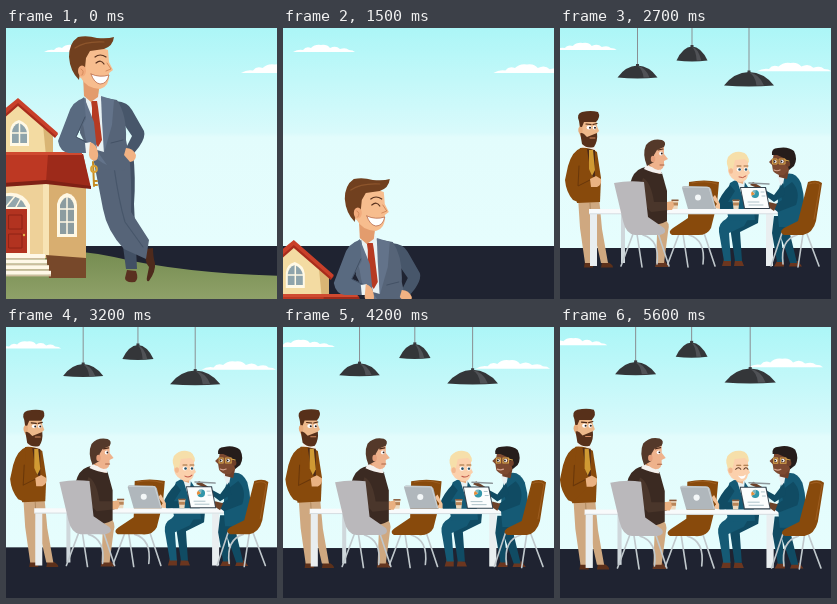
Recreate the animation shown at these times as an HTML page with a canvas. Size 271x271 px, loop 5700 ms.

```html
<!DOCTYPE html>
<html lang="en">
<head>
<meta charset="utf-8">
<title>House and meeting</title>
<style>
html, body { margin: 0; width: 100%; height: 100%; overflow: hidden; background: #dffafb; }
canvas { display: block; width: 100vw; height: 100vh; }
</style>
</head>
<body>
<canvas id="stage"></canvas>
<script>
const SIZE = 271, LOOP = 5700, STEP = 100;
const BROWN = '#884a0c', TEAL = '#155a75', DEEP_TEAL = '#104b63', TAN = '#cfa880';
const canvas = document.getElementById('stage');
const g = canvas.getContext('2d');
const paths = new Map();

function path(d) {
  if (!paths.has(d)) paths.set(d, new Path2D(d));
  return paths.get(d);
}
function fill(color, d) {
  g.fillStyle = color;
  g.fill(path(d));
}
function line(color, width, d) {
  g.strokeStyle = color;
  g.lineWidth = width;
  g.lineCap = g.lineJoin = 'round';
  g.stroke(path(d));
}
function oval(color, x, y, rx, ry = rx) {
  g.fillStyle = color;
  g.beginPath();
  g.ellipse(x, y, rx, ry, 0, 0, Math.PI * 2);
  g.fill();
}
function rect(color, x, y, w, h) {
  g.fillStyle = color;
  g.fillRect(x, y, w, h);
}
function group(x, y, scale, draw) {
  g.save();
  g.translate(x, y);
  g.scale(scale, scale);
  draw();
  g.restore();
}
const clamp = v => Math.min(1, Math.max(0, v));
const easeInOut = p => p < .5 ? 4 * p ** 3 : 1 - (2 - 2 * p) ** 3 / 2;

// piecewise linear value through [time, value] pairs
function track(t, keys) {
  let i = 1;
  while (i < keys.length - 1 && t > keys[i][0]) i++;
  const [a, va] = keys[i - 1], [b, vb] = keys[i];
  return va + (vb - va) * clamp((t - a) / (b - a));
}

function backdrop(t) {
  const sky = g.createLinearGradient(0, 0, 0, 218);
  sky.addColorStop(0, '#acf6f7');
  sky.addColorStop(.48, '#d9fafb');
  sky.addColorStop(.5, '#e2fcfc');
  sky.addColorStop(1, '#e6fdfd');
  rect(sky, 0, 0, SIZE, 225);
  const floor = track(t, [[1500, 218], [2700, 220], [5600, 222]]);
  rect('#1f2331', 0, floor, SIZE, SIZE - floor);
}

function clouds(t) {
  const x = track(t, [[0, 0], [1200, -16], [1500, -28], [1800, -38], [2000, -41], [5700, -53]]);
  const y = track(t, [[0, 0], [1500, 0], [2000, -1], [5700, -6]]);
  const shape = 'M0 7Q5 4 10 5Q13 1 18 3Q22-1 28 0Q34-1 37 3Q43 0 47 4Q53 2 56 5Q60 5 62 7Z';
  group(38 + x, 17 + y, 1, () => fill('#fff', shape));
  group(235 + x * .88, 36.5 + y * .8, 1.2, () => fill('#fff', shape));
}

function house() {
  fill('#f3dba2', 'M-4 84L12 76L47 106V128H-4Z');
  fill('#d9b574', 'M37 97L47 106V128H40Z');
  fill('#a82c1c', 'M12 71L52 106L49 110L12 78L-4 92V86Z');
  fill('#c9402a', 'M12 70L52 105L50 108L12 75L-4 89V83Z');
  fill('#fff9e6', 'M4 118V103Q5 94 13 92Q22 95 23 104V118Z');
  fill('#8fa4ab', 'M6 115V104Q7 97 13 95Q20 98 21 105V115Z');
  line('#fff9e6', 1.5, 'M13.5 95V115M6 105H21');

  fill('#eed199', 'M-4 154H42V230H-4Z');
  fill('#d8ae70', 'M42 155H80V230H42Z');
  fill('#f7e3b4', 'M37 156H43V228H37Z');
  fill('#77482a', 'M40 227L80 230V250H43Z');
  fill('#bd3823', 'M-4 126H77L84 159L40 154L-4 157Z');
  fill('#9d2a1a', 'M42 126H77L85 160L40 154Z');
  fill('#cf4a30', 'M-4 124H76V127H-4Z');
  fill('#7f2115', 'M-4 155L40 152L85 158V161L40 156L-4 159Z');

  fill('#fff8e4', 'M51 209V176Q53 167 61 165Q70 167 71 177V209Z');
  fill('#8c9ca0', 'M54 206V177Q56 171 61 169Q67 171 68 178V206Z');
  line('#fff8e4', 1.5, 'M61 169V206M54 181H68M54 194H68');

  fill('#fff8e4', 'M-4 226V166Q16 161 24 177V226Z');
  fill('#93a7ac', 'M-4 179V169Q14 165 20 179Z');
  line('#fff8e4', 1.5, 'M0 179L9 168M10 179L15 170');
  rect('#b23320', -4, 181, 25, 44);
  line('#8d2315', 1, 'M3 187H16V201H3ZM3 206H16V220H3Z');
  oval('#e6b64d', 18, 207, 1.2);
  for (let i = 0; i < 4; i++) {
    rect('#fff8e8', -4, 226 + i * 5.6, 43 + i * 2, 4);
    rect('#cdbd9e', -4, 230 + i * 5.6, 43 + i * 2, 1.6);
  }
}

function leaningMan() {
  // legs and shoes
  fill('#4e2a1c', 'M140 221L147 220Q147 229 149 235Q150 243 143 253Q140 254 141 249L143 239Q138 234 140 221Z');
  fill('#5a3020', 'M121 242L130 243Q133 251 129 254Q119 255 119 250Z');
  fill('#425064', 'M105 128L127 124Q130 150 128 176L131 241L120 241L112 180Z');
  fill('#566478', 'M86 124H123Q126 153 125 184L143 212L140 231L118 221Q101 203 97 181Z');
  line('#47566a', 1.2, 'M108 139Q113 174 119 194L137 219');
  // jacket and arms
  fill('#47566a', 'M110 73Q122 74 126 82L138 103Q140 109 133 119L124 130L118 124L126 108L115 92Z');
  fill('#566478', 'M75 71Q91 67 111 72Q121 87 120 112Q125 130 118 143L92 141Q80 117 74 105Z');
  fill('#e8f2f4', 'M79 65L94 66L97 78L98 124L91 122L81 83Z');
  fill('#b63a22', 'M85 73L91 73L92 79L96 112L92 119L86 111L86 80Z');
  fill('#63738a', 'M78 69L88 94L91 123L101 137Q81 129 78 101L72 75Z');
  fill('#63738a', 'M95 68L108 72L106 97L98 125L96 93Z');
  fill('#596a80', 'M78 70Q66 73 62 87L52 113Q54 124 63 125L84 125L85 115L70 109L80 91Z');
  line('#435165', 1, 'M79 89L70 109L82 115M105 115L117 112');
  fill('#edf4f4', 'M79 115L85 114L86 125L80 125Z');
  fill('#f2b283', 'M84 114Q91 116 92 125Q93 132 88 133Q82 130 83 125Z');
  fill('#f2b283', 'M120 120Q127 120 130 127Q130 133 124 134L118 127Z');
  // key
  line('#c48a22', 2, 'M87 134L88 158M88 153H91M88 157H91');
  g.strokeStyle = '#d9a133';
  g.lineWidth = 1.8;
  g.beginPath();
  g.arc(88, 141, 3, 0, Math.PI * 2);
  g.stroke();
  // head
  fill('#e39c6d', 'M77 48L94 54L92 69L85 74L78 68Z');
  fill('#f7bd8e', 'M72 25Q86 16 102 22L103 34L107 42L103 45Q104 58 94 61Q80 60 75 50Q68 48 69 40Z');
  fill('#71401f', 'M73 52Q64 43 63 29Q63 15 72 9Q81 7 91 10Q102 11 108 9Q107 18 98 21L84 23L80 30L79 40L74 41Z');
  line('#8d552c', 1.2, 'M69 20Q79 13 98 14');
  oval('#f2ab7c', 76, 43, 4, 5.5);
  line('#d48b5c', 1, 'M75 41Q79 43 76 47M101 35L105 41L100 43');
  line('#57301d', 1.2, 'M90 35Q95 31 98 36M89 29Q94 25 100 29');
  fill('#fff', 'M85 46Q94 50 103 47Q101 56 94 56Q88 55 85 46Z');
  line('#b96d4d', .8, 'M85 46Q94 50 103 47Q101 56 94 56Q88 55 85 46');
}

function houseScene(t) {
  const drop = 284 * easeInOut(clamp((t - 1200) / 600));
  group(-1.2 * Math.min(t, 1500) / 1500, drop, 1, () => {
    const grass = g.createLinearGradient(0, 222, 0, 271);
    grass.addColorStop(0, '#758c50');
    grass.addColorStop(1, '#8fa169');
    fill(grass, 'M-5 222Q55 218 108 229Q175 245 276 248V280H-5Z');
    house();
    leaningMan();
  });
}

function lamp(x, y, w, h) {
  const bottom = y + h;
  line('#8a8f93', 1, `M${x} -90V${y}`);
  rect('#3b3c40', x - 1.5, y - 2, 3, 4);
  fill('#343639', `M${x - w} ${bottom}Q${x - w * .6} ${y} ${x} ${y - .5}Q${x + w * .6} ${y} ${x + w} ${bottom}Q${x} ${bottom + 2} ${x - w} ${bottom}Z`);
  fill('#505256', `M${x} ${y}Q${x + w * .4} ${y + 1} ${x + w * .6} ${bottom}H${x + w * .3}Q${x + w * .25} ${y + 3} ${x} ${y}Z`);
}

function beardedMan(t) {
  fill('#5c301a', 'M25 233L33 233V239.5H24ZM42 234L47 234Q53 236 53 239.5H41Z');
  fill(TAN, 'M18 169H39L42 201L48 235H41L32 195L33 235H25L20 200Z');
  line('#b18a60', 1, 'M30 175L31 194');
  fill('#f4f1ea', 'M23 116L33 117L36 123L31 126L21 121Z');
  fill(BROWN, 'M20 120Q29 119 37 124L41 150L40 174L17 175Q14 160 13 148Z');
  fill('#4d2a17', 'M27 121L35 122L35 150L31 147Z');
  fill('#d09a33', 'M29 122L33 122L35 142L32 148L29 141Z');
  fill(BROWN, 'M21 120Q12 123 8 138L5 152Q6 164 13 172L18 174L32 160L30 152L18 158L20 140Z');
  line('#69370a', 1, 'M19 138L18 158L30 152');
  fill('#eab282', 'M30 151L36 148L41 151Q42 157 37 159L31 159Z');
  fill('#edb88a', 'M20 91L36 91L37 98L39 103L36 106L35 112L23 113L19 105Z');
  fill('#57301a', 'M19 93Q16 86 22 84Q31 82 38 84Q41 89 36 94L24 94L22 99H20Z');
  fill('#57301a', 'M20 104L24 106L27 109L37 105Q38 113 34 119Q27 121 22 116Z');
  oval('#e7aa7a', 20.5, 102, 2.2, 3.2);
  if (t >= 3500 && t < 3800) {
    line('#553019', 1.1, 'M27 99H31M33 99H36');
  } else {
    oval('#fff', 29, 99.5, 2.4, 2);
    oval('#fff', 34.5, 99.5, 1.8, 2);
    oval('#29201d', 30, 99.7, 1);
    oval('#29201d', 35, 99.7, 1);
  }
  line('#4d2914', 1.2, 'M26 96L31 96.5M33 96.5L37 95.5');
  line('#d68d63', 1, 'M30 110H35');
}

function chairLegs(x, flip) {
  g.save();
  g.translate(x, 0);
  g.scale(flip, 1);
  line('#c0c8cc', 1.6, 'M0 206L-12 238M4 206L9 239M25 205L36 238M10 207Q27 212 24 236');
  g.restore();
}

function middleChair() {
  chairLegs(119, 1);
  fill(BROWN, 'M129 154Q144 151 159 154L157 176L151 200Q147 208 136 207H112Q107 204 113 200L128 190Z');
  line('#9d5d20', 1, 'M132 155Q145 152 157 156');
}

function blondeWoman(t) {
  fill('#6b361f', 'M164 231L171 232V238H162ZM175 232L182 233L184 238H174Z');
  fill(DEEP_TEAL, 'M174 184H199L198 195L180 204L182 233H175L170 199Z');
  fill(TEAL, 'M172 184H192L184 198L169 205L171 233H164L159 204Q158 195 166 191Z');
  fill(TEAL, 'M170 155Q176 150 184 153L192 165L195 192L169 193Q163 172 170 155Z');
  fill('#e9f2f3', 'M177 152L185 153L183 171Z');
  fill(DEEP_TEAL, 'M170 157Q161 166 157 177L161 182L175 180L173 174L168 174L175 163Z');
  fill('#f3c298', 'M157 176L152 170L155 167L160 176L160 181L154 180Z');
  fill('#e8ad82', 'M176 146L184 148L183 156L177 154Z');
  fill('#fbd0ac', 'M169 130L188 130L188 141L190 145L188 147Q187 154 180 154Q170 152 168 143Z');
  fill('#f6dfaa', 'M170 143Q165 136 168 129Q173 123 181 124Q189 125 189 135L185 131L175 132L173 141Z');
  oval('#f2b88f', 171, 143, 2, 2.8);
  if (t >= 5400) {
    line('#54321f', 1, 'M176 142Q179 139 181 142M184 142Q186 139 188 142');
    fill('#fff', 'M178 148Q182 150 186 147Q185 152 181 151Z');
  } else {
    oval('#fff', 179, 141.5, 2.3, 2);
    oval('#fff', 185.8, 141.5, 1.9, 2);
    oval('#285066', 179.6, 141.5, 1.3);
    oval('#285066', 186, 141.5, 1.2);
    line('#c15a4a', 1, 'M179 149Q183 151 186 148');
  }
  line('#9b6a3a', 1, 'M177 138L181 138M184 138L188 138');
}

function presenter() {
  fill('#6b361f', 'M217 233L224 232V238.5H214ZM231 233H238L242 238.5H229Z');
  fill(DEEP_TEAL, 'M214 188H240L242 199L230 206L237 235H230L221 209L224 234H217L212 205Z');
  fill(TEAL, 'M223 147Q235 142 241 155Q247 175 242 199H219Q215 168 223 147Z');
  fill('#e8f0f2', 'M217 147L225 146L222 162Z');
  fill('#70402a', 'M218 138L230 137L227 151L219 149Z');
  fill('#7d4930', 'M214 124L230 124L232 138L224 147Q217 148 213 143L212 137L209 134L213 130Z');
  fill('#261d1b', 'M212 127Q211 120 218 120Q228 118 234 123Q238 131 234 138L229 142L226 131L217 127Z');
  oval('#70402a', 228, 136, 2.2, 2.8);
  line('#d8a74b', 1, 'M213 131H217V136H213ZM219.5 131H225V136H219.5ZM225 132L229 133');
  oval('#fff', 215, 133.5, 1.5);
  oval('#fff', 222, 133.5, 1.7);
  oval('#1e1718', 214.5, 133.5, .9);
  oval('#1e1718', 221.5, 133.5, .9);
  line('#d8a590', 1.2, 'M214 142Q217 143.5 220 142');
  fill(DEEP_TEAL, 'M232 154Q241 163 236 177L218 184L211 179L222 172L220 163Z');
  fill(DEEP_TEAL, 'M223 155L214 167L203 161L202 165L214 174L225 167Z');
  fill('#6d4229', 'M203 160L193 154L190 157L200 161Z');
  line('#8e979b', 1.5, 'M189 155L209 156');
  fill('#6d4229', 'M217 176L209 174L208 179L214 183Z');
}

function table() {
  rect('#cfd7db', 61, 186, 4, 49);
  rect('#e9eef0', 30, 186, 7, 52);
  rect('#e9eef0', 206, 186, 7, 52);
  fill('#f8fafb', 'M29 181H236V186H29Z');
  rect('#d5dde1', 29, 185.3, 207, 1);
}

function cup(x) {
  fill('#ecd9c0', `M${x - 3.5} 172H${x + 3.5}L${x + 2.5} 181H${x - 2.5}Z`);
  rect('#b88558', x - 3, 174.5, 6, 3);
  rect('#8a5c3d', x - 3.5, 171.5, 7, 1.5);
}

function tableTop(t) {
  fill('#b0b7bc', 'M122 160Q122 158 124 158L147 158.5Q150 158.5 151 161L156 181H128Z');
  line('#cbd2d5', 1, 'M123 159L149 159.5L155 180');
  oval('#f3f7f8', 138, 169.5, 3);
  cup(115);
  cup(176);
  fill('#33414d', 'M180 159H206L210 181H184Z');
  fill('#fbfdfd', 'M181 160H205L209 180H185Z');
  const grow = track(t, [[2000, 0], [2700, 1]]);
  const colors = ['#3296aa', '#e58c38', '#81b5bc'];
  const ends = [-1.5, 1.2 + grow * 1.5, 3.5 + grow * .4, 4.78];
  colors.forEach((color, i) => {
    g.fillStyle = color;
    g.beginPath();
    g.moveTo(195, 166);
    g.arc(195, 166, 4, ends[i], ends[i + 1]);
    g.fill();
  });
  line('#a7bdc5', .9, 'M188 174H199M189 177H203M201 164H204M202 168H205');
}

function seatedMan() {
  fill('#643620', 'M97 232L104 232L109 239H95Z');
  fill(TAN, 'M80 190H103Q111 194 108 204L104 235H96L97 207L82 206Z');
  fill('#3b2a22', 'M82 140Q94 136 102 145L107 163L107 193Q94 200 78 196Q68 176 70 156Q73 143 82 140Z');
  fill('#4a362b', 'M83 150Q91 154 94 174L108 174L109 182L91 184Q82 176 79 163Z');
  fill('#e9b081', 'M107 174L113 173L114 178L112 182L107 182Z');
  fill('#d99566', 'M88 131L101 136L100 146L89 142Z');
  fill('#f4f1ee', 'M86 137Q94 140 100 140L102 146Q92 145 84 141Z');
  fill('#eeb28c', 'M89 119L104 117L104 126L108 131L104 133Q105 142 98 142Q90 140 88 132Z');
  fill('#54392a', 'M87 138Q82 126 86 117Q92 110 102 112Q107 114 104 119L97 122L94 127V134Z');
  oval('#e6a07c', 93, 131, 2.2, 3.2);
  oval('#fff', 101, 125.5, 1.8, 1.9);
  oval('#2a1b18', 101.8, 125.5, .9);
  line('#4a2817', 1.2, 'M98 122L103 121');
  line('#aa6546', 1, 'M100 137H104');
}

function frontChairs() {
  chairLegs(73, 1);
  fill('#bab8bb', 'M54 155Q69 152 84 154L88 189L104 200Q108 205 100 207H75Q66 206 63 193Z');
  chairLegs(247, -1);
  fill(BROWN, 'M248 154Q257 151 262 155L256 193Q253 205 243 207H224Q218 204 224 200L238 193Z');
  line('#9d5d20', 1, 'M249 156Q257 153 260 157L254 191');
}

function meetingScene(t) {
  if (t < 1500) return;
  const u = (t - 2700) / 2900, zoom = 1 + .0275 * u;
  const left = (1 - clamp((t - 1500) / 720)) ** 4;
  group(-4 * u, -3.6 * u - 75 * left, zoom, () => {
    lamp(77.5, 38, 20, 11.5);
    lamp(132, 19, 15.5, 13.5);
    lamp(189, 44.5, 25, 13);
  });
  group(-5.2 * u + 290 * left, -3.6 * u, zoom, () => {
    beardedMan(t);
    middleChair();
    blondeWoman(t);
    table();
    presenter();
    tableTop(t);
    seatedMan();
    frontChairs();
  });
}

function fit() {
  const ratio = window.devicePixelRatio || 1;
  const w = Math.round(innerWidth * ratio), h = Math.round(innerHeight * ratio);
  if (canvas.width !== w || canvas.height !== h) {
    canvas.width = w;
    canvas.height = h;
  }
  g.setTransform(w / SIZE, 0, 0, h / SIZE, 0, 0);
}

const start = performance.now();
function render(now) {
  const elapsed = Math.max(0, now - start) % LOOP;
  const t = Math.floor(elapsed / STEP) * STEP;
  fit();
  backdrop(t);
  clouds(t);
  if (t < 1800) houseScene(t);
  meetingScene(t);
  requestAnimationFrame(render);
}
render(start);
</script>
</body>
</html>
```
